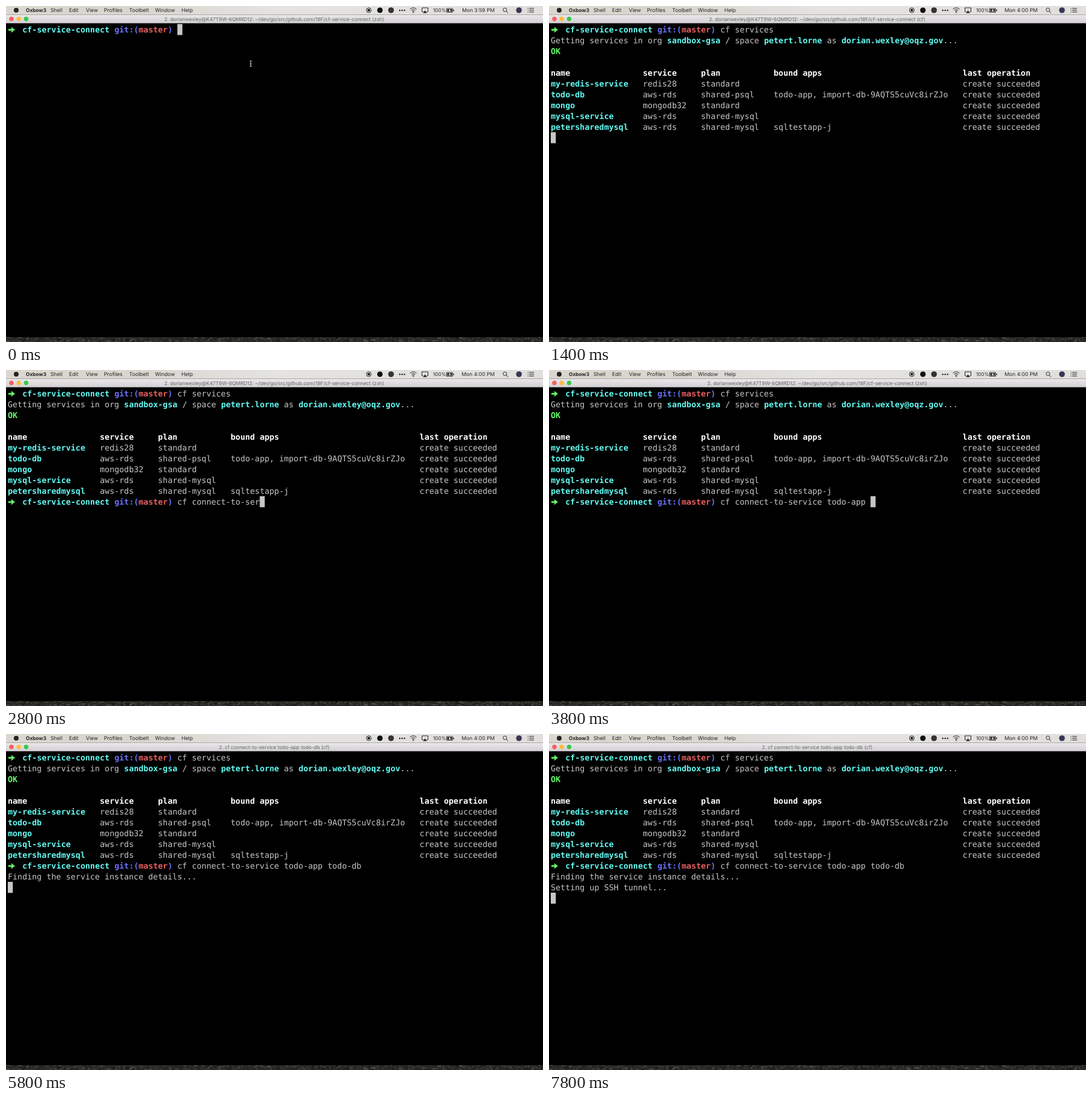
An HTML page with a canvas for the animation above (8 s loop, 894 px wide and 559 px high).

```html
<!DOCTYPE html>
<html lang="en">
<head>
<meta charset="utf-8">
<title>Terminal session</title>
<style>
  html, body { margin: 0; width: 100%; height: 100%; overflow: hidden; background: #000; }
  canvas { display: block; width: 894px; height: 559px; }
</style>
</head>
<body>
<canvas id="stage" width="894" height="559"></canvas>
<script>
const W = 894, H = 559, LOOP = 8000, STEP = 200;
const LEFT = 3, CELL = 8.066, ROW = 18;
const GREY = '#c7c7c7', WHITE = '#ffffff', CYAN = '#62fbf2';
const GREEN = '#62fa68', BLUE = '#6a71f8', RED = '#e85f60', INK = '#242424';
const MONO = '13.4px "DejaVu Sans Mono", monospace';
const UI = 'Inter, Roboto, sans-serif';

const ctx = document.getElementById('stage').getContext('2d');
ctx.textRendering = 'geometricPrecision';

const FIRST = 'cf services', SECOND = 'cf connect-to-service todo-app todo-db';
const HOME = 'dorianwexley@K47T9W-6QMRD12: ~/dev/go/src/github.com/18F/cf-service-connect';
const MENU = [['Shell', 74], ['Edit', 105], ['View', 133], ['Profiles', 163],
  ['Toolbelt', 205], ['Window', 248], ['Help', 292]];

// Each run of text is [column, text, colour].
const COLUMNS = [0, 19, 31, 46, 85];
const tableRow = (cells, first = CYAN, rest = GREY) =>
  cells.map((text, i) => [COLUMNS[i], text, i ? rest : first]);
const service = (...cells) => tableRow([...cells, 'create succeeded']);

const GETTING = [
  [0, 'Getting services in org', GREY], [24, 'sandbox-gsa', CYAN],
  [36, '/ space', GREY], [44, 'petert.lorne', CYAN], [57, 'as', GREY],
  [60, 'dorian.wexley@oqz.gov', CYAN], [81, '...', GREY]
];
const OK = [[0, 'OK', GREEN]];
const TABLE = [
  [],
  tableRow(['name', 'service', 'plan', 'bound apps', 'last operation'], WHITE, WHITE),
  service('my-redis-service', 'redis28', 'standard', ''),
  service('todo-db', 'aws-rds', 'shared-psql', 'todo-app, import-db-9AQTS5cuVc8irZJo'),
  service('mongo', 'mongodb32', 'standard', ''),
  service('mysql-service', 'aws-rds', 'shared-mysql', ''),
  service('petersharedmysql', 'aws-rds', 'shared-mysql', 'sqltestapp-j')
];
const FINDING = [[0, 'Finding the service instance details...', GREY]];
const SETTING = [[0, 'Setting up SSH tunnel...', GREY]];

const prompt = command => [
  [0, '➜', GREEN], [3, 'cf-service-connect', CYAN], [22, 'git:(', BLUE],
  [27, 'master', RED], [33, ')', BLUE], [35, command, GREY]
];

// Number of characters typed at time t, from `start` on.
const typed = (text, t, start, msPerChar) =>
  text.slice(0, Math.max(0, Math.round((t - start) / msPerChar)));

function screenAt(t) {
  const first = typed(FIRST, t, 0, 600 / 11);
  const second = typed(SECOND, t, 1600, 1200 / 17);
  const lines = [prompt(first)];
  if (t >= 1000) lines.push(GETTING);
  if (t >= 1200) lines.push(OK);
  if (t >= 1400) lines.push(...TABLE);
  if (t >= 1600) lines.push(prompt(second));
  if (t >= 4600) lines.push(FINDING);
  if (t >= 6200) lines.push(SETTING);

  let cursor = [0, lines.length];
  if (t < 800) cursor = [35 + first.length, 0];
  else if (t >= 1600 && t < 4400) cursor = [35 + second.length, 10];

  let title = HOME + ' (zsh)';
  if (t >= 4400) title = SECOND + (t < 4600 ? ' (zsh)' : ' (cf)');
  else if (t >= 1400 && t < 1600) title = HOME + ' (cf)';
  else if (t >= 800 && t < 1400) title = FIRST + (t < 1000 ? ' (zsh)' : ' (cf)');
  return { lines, cursor, title: '2. ' + title };
}

function rect(x, y, w, h, color) {
  ctx.fillStyle = color;
  ctx.fillRect(x, y, w, h);
}

function disc(x, y, r, color) {
  ctx.fillStyle = color;
  ctx.beginPath();
  ctx.arc(x, y, r, 0, 7);
  ctx.fill();
}

function label(text, x, y, font, color, align = 'left') {
  ctx.font = font;
  ctx.fillStyle = color;
  ctx.textAlign = align;
  ctx.fillText(text, x, y);
}

function stroke(path, width = 1, color = INK) {
  ctx.lineWidth = width;
  ctx.strokeStyle = color;
  ctx.stroke(new Path2D(path));
}

function fill(path, color = INK) {
  ctx.fillStyle = color;
  ctx.fill(new Path2D(path));
}

function gradient(x, y, ...colors) {
  const g = ctx.createLinearGradient(0, 0, x, y);
  colors.forEach((c, i) => g.addColorStop(i / (colors.length - 1), c));
  return g;
}

function drawWallpaper() {
  let seed = 7;
  const random = () => (seed = seed * 16807 % 2147483647) / 2147483647;
  rect(0, 551, W, 8, '#2c2b28');
  for (let i = 0; i < 1500; i++) {
    const v = 18 + 95 * random() ** 2;
    rect(random() * W, 551 + random() * 8, 1 + random() * 3, 1, `rgb(${v},${v - 2},${v - 7})`);
  }
}

function drawStatusIcons() {
  stroke('M608 7a4 4 0 1 1-8 0a4 4 0 1 1 8 0');
  rect(602, 5, 4, 4, INK);
  disc(622.5, 7, 4.6, '#111');
  disc(641, 7, 4.8, '#333');
  for (const x of [656, 660, 664]) disc(x - .5, 7.3, 1.2, INK);
  stroke('M672.5 5.2q5.5-4.6 11 0M674.5 7.2q3.5-3 7 0M676.4 9q1.6-1.4 3.2 0');
  disc(678, 10.4, 1, INK);
  stroke('M694.5 9.5h-2v-6.5h10v6.5h-2');
  fill('M697.5 7.5l3.5 4.2h-7z');
  stroke('M733.5 4h10v6.5h-10z', .8);
  rect(734.5, 5, 8, 4.5, INK);
  rect(744.5, 6, 1.5, 2.5, INK);
  fill('M739.5 4l-3 4h2l-.8 2.8l3.2-4h-2z', '#eee');
  stroke('M833.6 6.3a3 3 0 1 1-6 0a3 3 0 1 1 6 0M832.8 8.5l3.2 3.2');
  disc(854, 7, 4.8, '#3b3658');
  for (const y of [4, 7, 10]) {
    rect(868.5, y - .5, 1.3, 1, INK);
    rect(871, y - .5, 8, 1, INK);
  }
}

function drawMenuBar(t) {
  rect(0, 0, W, 14, gradient(W, 0, '#dad7cf', '#d9d6cf', '#e4e3e0', '#e2e1de', '#e0dfdc'));
  rect(0, 14, W, 1, '#a9a8a6');
  disc(17, 7, 4, INK);
  label('Oxbow3', 33, 10.2, `bold 8.4px ${UI}`, INK);
  for (const [text, x] of MENU) label(text, x, 10.2, `8.7px ${UI}`, INK);
  label('100%', 711, 10.2, `8.2px ${UI}`, INK);
  label(t < 600 ? 'Mon 3:59 PM' : 'Mon 4:00 PM', 813.5, 10.2, `8.6px ${UI}`, INK, 'right');
  drawStatusIcons();
}

function drawTitleBar(title) {
  rect(0, 15, W, 13, gradient(0, 28, '#f2f0f2', '#ebe9eb', '#d3d1d3'));
  rect(0, 28, W, 1, '#8d8c8d');
  disc(9, 21.5, 3.7, '#fc5b57');
  disc(21.2, 21.5, 3.7, '#fdbc40');
  disc(33.5, 21.5, 3.7, '#34c84a');
  label(title, 446.5, 24.6, `8.3px ${UI}`, '#666', 'center');
}

function drawArrow(y) {
  fill(`M4 ${y - 1.3}h5.5l-1.3-2.8h1.6l5 4.1l-5 4.1h-1.6l1.3-2.8h-5.5z`, GREEN);
}

function drawTerminal(lines, [col, row]) {
  rect(0, 29, W, 522, '#000');
  lines.forEach((runs, r) => {
    for (const [c, text, color] of runs) {
      if (text === '➜') drawArrow(39.6 + r * ROW);
      else label(text, LEFT + c * CELL, 44 + r * ROW, (color === GREY ? '' : 'bold ') + MONO, color);
    }
  });
  rect(LEFT + col * CELL, 30 + row * ROW, 8.3, 18.3, GREY);
}

function draw(now) {
  const t = Math.floor(now % LOOP / STEP) * STEP;
  const { lines, cursor, title } = screenAt(t);
  drawMenuBar(t);
  drawTitleBar(title);
  drawTerminal(lines, cursor);
  if (t < STEP) stroke('M405.8 91.2q1.7 0 1.7 1.5v6.6q0 1.5-1.7 1.5M409.2 91.2q-1.7 0-1.7 1.5M407.5 99.3q0 1.5 1.7 1.5M406.3 96.5h2.4', 1, '#ddd');
  requestAnimationFrame(draw);
}

drawWallpaper();
const start = performance.now();
draw(0);
function draw0() {}
</script>
</body>
</html>
```
